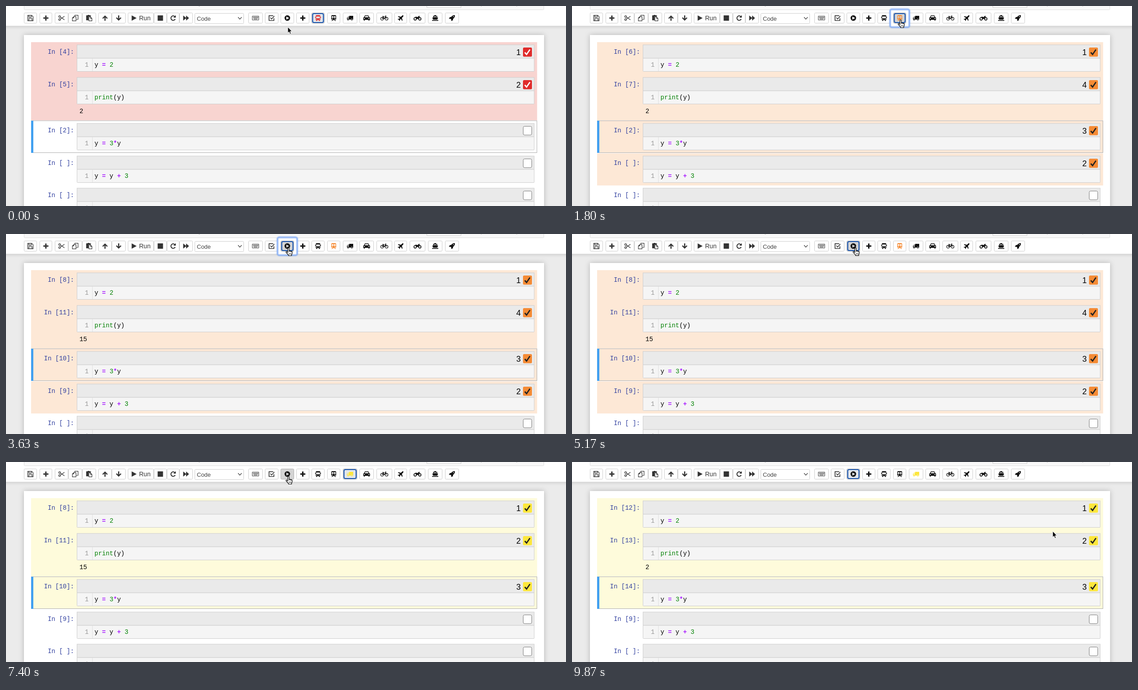
Animation of 1250 by 448 pixels, one loop 9.9 s. Source, as an HTML page:

```html
<!DOCTYPE html>
<html lang="en">
<head>
<meta charset="utf-8">
<title>Notebook execution lines</title>
<style>
html, body { margin: 0; width: 100%; height: 100%; overflow: hidden; background: #ebebeb; }
svg { display: block; }
text { font: 14px "Liberation Sans", Arial, sans-serif; white-space: pre; }
.mono { font-family: "Liberation Mono", "Courier New", monospace; }
.prompt { fill: #303f9f; text-anchor: end; }
.op { fill: #a2f; font-weight: bold; }
.num, .fn { fill: #008000; }
.order { font-size: 18px; text-anchor: end; }
.paper { filter: drop-shadow(0 0 6px rgba(87, 87, 87, .35)); }
.bar { filter: drop-shadow(0 0 4px rgba(87, 87, 87, .35)); }
</style>
</head>
<body>
<svg width="1250" height="448" viewBox="0 0 1250 448">
  <rect width="1250" height="448" fill="#ebebeb"/>
  <rect class="paper" x="40" y="65" width="1161" height="420" fill="#fff"/>
  <rect class="bar" x="-20" y="-20" width="1290" height="64.5" fill="#fff"/>
  <rect x="40.5" y="-20" width="1160" height="28.5" rx="2" fill="#f8f8f8" stroke="#dedede"/>
  <rect x="939.5" y="-20" width="76" height="23.5" fill="#fff" stroke="#ccc"/>
  <path d="M430 0h3M1060 0h2M1139 0h2" stroke="#999"/>
  <g id="scene"></g>
</svg>
<script>
const LOOP = 9900;
const scene = document.getElementById('scene');

const disc = (x, y, r) => `M${x - r} ${y}a${r} ${r} 0 1 0 ${2 * r} 0a${r} ${r} 0 1 0 ${-2 * r} 0z`;

// name: [filled path, stroked path, stroke width], centred on 0,0
const icons = {
  save: ['', 'M-6-6H3L6-3V6H-6ZM-3.5-6V-2H2V-6M-3.5 6V1.2H3.5V6', 1.3],
  add: ['M-1.5-5.7H1.5V-1.5H5.7V1.5H1.5V5.7H-1.5V1.5H-5.7V-1.5H-1.5Z'],
  cut: ['', disc(-4.3, -3.3, 2) + disc(-4.3, 3.3, 2) + 'M-2.6-2.2L6.5 4M-2.6 2.2L6.5-4', 1.3],
  copy: ['', 'M-1-3V-6.3H6.3V3H2M-3.5-3.2H1.8V6.3H-6.3V-.3ZM-3.5-3.2V-.3H-6.3', 1.2],
  paste: ['M-6.5-6H-3.5V-7H1V-6H4V-3H-1V5H-6.5Z', 'M-.5-2H3.5L6.3 .8V6.4H-.5ZM3.3-2V1H6.3', 1.2],
  up: ['M0-6L6 0L4.4 1.7L1.3-1.3V6H-1.3V-1.3L-4.4 1.7L-6 0Z'],
  down: ['M0 6L6 0L4.4-1.7L1.3 1.3V-6H-1.3V1.3L-4.4-1.7L-6 0Z'],
  run: ['M-5.5-6L5.5 0L-5.5 6Z'],
  stop: ['M-6-6H6V6H-6Z'],
  redo: ['M6-6.5V-1H.5Z', 'M4.7 2.2A5 5 0 1 1 3.6-3.6', 2],
  skip: ['M-6.5-5.8L0-.5V-5.8L6.5 0L0 5.8V.5L-6.5 5.8Z'],
  keys: ['', 'M-7.2-4.3H7.2V4.3H-7.2ZM-5.5-2H6M-5.5 0H6M-4 2.2H4', 1],
  tick: ['', 'M5 .5V5.5H-5.8V-5.3H3.5M-3-1L0 2L6-4.5', 1.7],
  play: [disc(0, 0, 6.2) + 'M-2.3-3.6L4 0L-2.3 3.6Z'],
  bus: ['M-5-5Q-5-6.5-3-6.5H3Q5-6.5 5-5V4.5H4V6.5H2V4.5H-2V6.5H-4V4.5H-5ZM-4-3.5V.5H4V-3.5Z' +
    'M-6.5-3H-5.5V0H-6.5ZM5.5-3H6.5V0H5.5ZM-3.7 2H-2V3.2H-3.7ZM2 2H3.7V3.2H2Z'],
  train: ['M-5.5-4.5Q-5.5-6.5-3-6.5H3Q5.5-6.5 5.5-4.5V2Q5.5 4 3 4L5 6.5H3.5L1.5 4.5H-1.5L-3.5 6.5H-5' +
    'L-3 4Q-5.5 4-5.5 2ZM-4.3-4V-.5H-.6V-4ZM.6-4V-.5H4.3V-4ZM-3.8 1H-2V2.8H-3.8ZM2 1H3.8V2.8H2Z'],
  truck: ['M-2-5H7V3.5H6A2 2 0 0 0 2 3.5H-2.5A2 2 0 0 0-6.5 3.5H-7V-.5L-4.5-3H-2ZM-3-2H-4.2L-6-.2V.5H-3Z' +
    disc(4, 3.8, 1.5) + disc(-4.5, 3.8, 1.5)],
  car: ['M-7.5 0Q-7.5-1.5-6-1.8L-4.5-5Q-4-6-3-6H3Q4-6 4.5-5L6-1.8Q7.5-1.5 7.5 0V4H6.5V5.5H3.8V4H-3.8V5.5' +
    'H-6.5V4H-7.5ZM-4.2-1.8H4.2L3.2-4.6H-3.2ZM-6 .3H-4V2H-6ZM4 .3H6V2H4Z'],
  bike: ['', disc(-5, 1.5, 3.2) + disc(5, 1.5, 3.2) +
    'M-5 1.5L-2.5-3H3L0 1.5H-5M-3-3.5L0 1.5M5 1.5L2.5-5H4.5M-4.5-4H-1.5', 1.2],
  plane: ['M6-6Q6.8-4 4.5-2.2L2.8-.5L4.2 5.2L3 6.2L.6 1.7L-1.8 4V6L-2.8 6.8L-4 4L-6.8 2.8L-6 1.8H-4' +
    'L-1.7-.6L-6.2-3L-5.2-4.2L.5-2.8L2.2-4.5Q4-6.8 6-6Z'],
  motor: ['M-7-2.5L-2-3L0-2L3-4.5L2-5H4.5L5.2 1.8L3-2L2 2H-2.5L-3.5-1.5Z',
    disc(-5.2, 1.8, 2.8) + disc(5.2, 1.8, 2.8), 1.6],
  ship: ['M-2-6.5H2V-5H4.5V-1.5L6.5-.5L4.5 3.5H-4.5L-6.5-.5L-4.5-1.5V-5H-2ZM-3-3.5V-1.5L0-2.5L3-1.5V-3.5Z' +
    'M-7 4.5H7V6.2H-7Z'],
  rocket: ['M6.5-6.5Q7-1.5 2.5 1.8L2 5L-2 6.8L-1.5 3.5L-3.5 1.5L-6.8 2L-5-2L-1.8-2.5Q1.5-7 6.5-6.5Z' +
    disc(3.2, -3.3, 1)]
};

// name, left, right
const buttons = [
  ['save', 40, 69], ['add', 75, 103], ['cut', 109, 139], ['copy', 139, 170], ['paste', 170, 201],
  ['up', 206, 236], ['down', 236, 267], ['run', 272, 330], ['stop', 330, 359], ['redo', 359, 387],
  ['skip', 387, 417], ['keys', 541, 573], ['tick', 578, 608], ['play', 613, 643], ['add', 648, 677],
  ['bus', 682, 711], ['train', 717, 746], ['truck', 752, 784], ['car', 789, 821], ['bike', 827, 862],
  ['plane', 867, 895], ['motor', 901, 936], ['ship', 942, 974], ['rocket', 980, 1011]
];

const lines = {
  bus: { color: '#e02b2b', tint: '#f8d4d0', mark: '#fff', order: [1, 2] },
  train: { color: '#f58b35', tint: '#fde8d6', mark: '#222', order: [1, 4, 3, 2] },
  truck: { color: '#fde73c', tint: '#fefbdb', mark: '#222', order: [1, 2, 3] }
};

// header top, background top and height, code
const cells = [
  [87, 81, 72, 'y = 2'], [160, 154, 102, 'print(y)'], [263, 257, 72, 'y = 3*y'],
  [336, 330, 72, 'y = y + 3'], [408, 402, 72, '']
];

// button, press time, ring grown, ring release
const clicks = [
  ['bus', -900, -800, -700], ['play', 670, 800, 1170], ['train', 1690, 1800, 2030],
  ['play', 3490, 3600, 4400], ['truck', 6160, 6310, 6530], ['play', 8200, 8350, 9100]
];
const activeLine = [[0, 'bus'], [1770, 'train'], [6250, 'truck']];
// time, prompt counters, printed output
const runs = [
  [0, [4, 5, 2, ' ', ' '], 2], [770, [6, 7, 2, ' ', ' '], 2],
  [3590, [8, 11, 10, 9, ' '], 15], [8350, [12, 13, 14, 9, ' '], 2]
];
const path = [
  [0, 629, 47], [30, 629, 47], [480, 631, 31], [1170, 631, 31], [1620, 734, 31], [2080, 734, 31],
  [2700, 631, 31], [5130, 631, 31], [5670, 778, 26], [6560, 778, 26], [7390, 631, 32],
  [9110, 631, 32], [9560, 1136, 163], [9860, 1073, 155], [LOOP, 1073, 155]
];

const clamp = v => Math.max(0, Math.min(1, v));
const latest = (list, t, key = 0) => list.filter(e => e[key] <= t).pop();

function cursorAt(t) {
  const i = path.findIndex(p => p[0] > t);
  const [t0, x0, y0] = path[i - 1], [t1, x1, y1] = path[i];
  const k = (t - t0) / (t1 - t0), e = k * k * (3 - 2 * k);
  return [x0 + (x1 - x0) * e, y0 + (y1 - y0) * e];
}

const rect = (x, y, w, h, fill, stroke = 'none', extra = '') =>
  `<rect x="${x}" y="${y}" width="${w}" height="${h}" fill="${fill}" stroke="${stroke}" ${extra}/>`;
const text = (x, y, s, cls = '', fill = '') =>
  `<text x="${x}" y="${y}" class="${cls}"${fill && ` fill="${fill}"`}>${s}</text>`;

function icon(name, x, color) {
  const [fill, stroke, width] = icons[name];
  return `<g transform="translate(${x} 27)"><path d="${fill}" fill="${color}" fill-rule="evenodd"/>` +
    (stroke ? `<path d="${stroke}" fill="none" stroke="${color}" stroke-width="${width}"/>` : '') + '</g>';
}

function button([name, x0, x1], s) {
  const focused = s.focus === name, hover = s.hover && s.hover[1] === x0;
  const bg = focused && s.pressed ? '#b0b0b0' : hover ? '#d4d4d4' : focused ? '#e2e6ea' : '#fff';
  const color = name === s.line ? lines[name].color : x0 > 600 ? '#111' : '#333';
  return rect(x0 + .5, 15.5, x1 - x0 - 1, 23, bg, hover || focused ? '#adadad' : '#ccc', 'rx="2"') +
    (focused ? rect(x0 + 2.5, 17, x1 - x0 - 5, 20, 'none', '#1b58b4', 'rx="3" stroke-width="2.2"') : '') +
    icon(name, name === 'run' ? 286 : (x0 + x1) / 2, color) +
    (name === 'run' ? text(297, 32, 'Run', '', '#333') : '');
}

// Soft ring that closes in around a pressed button
function halo([, x0, x1], g) {
  const w = (x1 - x0) / 2 + 11 - 4 * g, h = 25 - 5 * g, x = (x0 + x1) / 2 - w, y = 27.5 - h;
  const ring = (width, alpha) => rect(x, y, 2 * w, 2 * h, 'none', '#76a2f3',
    `rx="4" stroke-width="${width}" stroke-opacity="${alpha}"`);
  return `<g opacity="${g.toFixed(2)}">` + rect(x, y, 2 * w, 2 * h, '#fff', 'none', 'rx="4"') +
    ring(6, .25) + ring(4, .3) + ring(2, .6) + '</g>';
}

function toolbar(s) {
  const focused = buttons.find(b => b[0] === s.focus);
  return buttons.map(b => button(b, s)).join('') +
    rect(421.5, 16.5, 109, 23, '#fff', '#ccc', 'rx="2"') + text(426, 33, 'Code', '', '#444" style="font-size:13px') +
    '<path d="M518 25l4 4.5l4-4.5" fill="none" stroke="#444" stroke-width="1.3"/>' +
    (s.glow > 0 ? halo(focused, s.glow) + button(focused, s) : '');
}

const highlight = code => code.replace(/[=*+]|\d|print/g, m =>
  `<tspan class="${m === 'print' ? 'fn' : /\d/.test(m) ? 'num' : 'op'}">${m}</tspan>`);

function cell([top, bgTop, bgHeight, code], i, s) {
  const { color, tint, mark, order } = lines[s.line], n = order[i], selected = i === 2;
  return (n ? rect(56, bgTop, 1129.5, bgHeight, tint) +
      (i === 1 ? rect(56, 152.5, 1129.5, 1.5, tint) : '') : '') +
    (selected ? rect(56.5, 257, 1128.5, 71.5, 'none', '#ababab') + rect(56, 257, 5, 72, '#42a0f0') : '') +
    rect(158.5, top, 1020.5, 30, '#eaeaea', '#cdcdcd') +
    rect(158.5, top + 30, 1020.5, 29.5, '#f5f5f5', '#cdcdcd', 'rx="1"') +
    `<path d="M193 ${top + 30.5}v28.5" stroke="#ddd"/>` +
    text(152, top + 20, `In [${s.counts[i]}]:`, 'mono prompt') +
    text(176, top + 49, '1', 'mono', '#999') +
    text(197.5, top + 49, highlight(code), 'mono') +
    (i === 1 ? text(164, 239.5, s.output, 'mono') : '') +
    (n ? text(1149, top + 23, n, 'order') + rect(1154, top + 6, 20, 20.5, color, 'none', 'rx="2.5"') +
      `<path d="M1158 ${top + 17}l4 4.5l7.5-11" fill="none" stroke="${mark}" stroke-width="2.8"/>`
      : rect(1154.5, top + 6.5, 19, 19.5, '#fff', '#777', 'rx="3"'));
}

function cursor([x, y], hand) {
  const shape = hand
    ? `<path d="M-2 1.5Q-2 0-.5 0T1 1.5V7q1.5-1 2.5 .3q1.6-.7 2.3 .6q1.8-.4 2 1.5V12Q7.5 14 6.5 15V17.5H-.5V16
        Q-3 13.5-6 10Q-6.5 8-4.5 8.3L-2 10.5Z" fill="#fff" stroke="#000" stroke-width="1.2"/>
       <path d="M1 7v2.5M3.5 7.5v2M5.8 8v2M1 12v3M3 12v3M5 12v3" stroke="#000" stroke-width=".8"/>`
    : '<path d="M0 0V13.5L3 10.8L5 15.7L7.3 14.7L5.2 10H9.3Z" stroke="#fff"/>';
  return `<g transform="translate(${x.toFixed(1)} ${y.toFixed(1)})">${shape}</g>`;
}

function render(t) {
  const pos = cursorAt(t), [x, y] = pos;
  const [focus, press, grown, release] = latest(clicks, t, 1);
  const [, counts, output] = latest(runs, t);
  const state = {
    focus, counts, output,
    line: latest(activeLine, t)[1],
    pressed: t - press < 100,
    glow: Math.min(clamp((t - press) / (grown - press)), clamp(1 - (t - release) / 150)),
    hover: y > 15 && y < 39 && buttons.find(b => x >= b[1] && x <= b[2])
  };
  return cells.map((c, i) => cell(c, i, state)).join('') + toolbar(state) + cursor(pos, state.hover);
}

let shown = '';
function frame() {
  const html = render(performance.now() % LOOP);
  if (html !== shown) scene.innerHTML = shown = html;
  requestAnimationFrame(frame);
}
frame();
</script>
</body>
</html>
```
